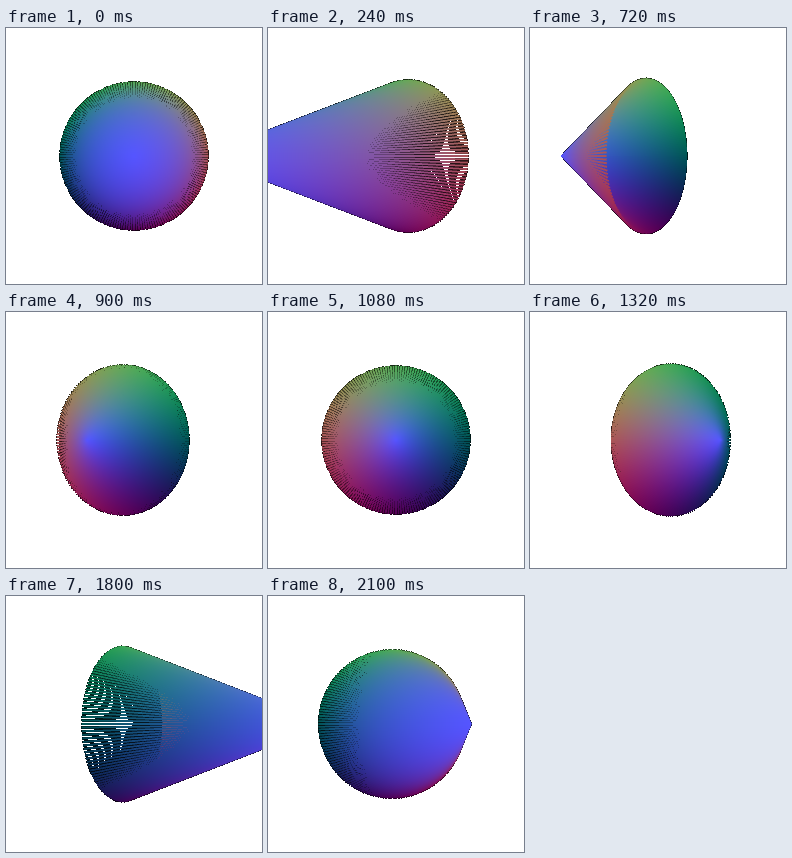
An HTML page with a canvas that plays this animation: 256 px wide and 256 px high, repeating every 2160 ms.

```html
<!DOCTYPE html>
<html lang="en">
<head>
<meta charset="utf-8">
<title>Turning cone</title>
<style>
html, body { margin: 0; width: 100%; height: 100%; overflow: hidden; background: #fff; }
canvas { display: block; width: 100vw; height: 100vh; image-rendering: pixelated; }
</style>
</head>
<body>
<canvas id="stage" width="256" height="256"></canvas>
<script>
const SIZE = 256, MID = SIZE / 2;
const STEPS = 36, STEP_MS = 60;
const LINES = 180, HALF_WIDTH = 1, CAP = .5;
const HEIGHT = 2, EYE = 3;
const FOCAL = MID / Math.tan(Math.PI / 6);
const SAMPLES = [[.375, .125], [.875, .375], [.125, .625], [.625, .875]];

const ctx = document.getElementById('stage').getContext('2d');
const image = ctx.createImageData(SIZE, SIZE);
const near = new Float32Array(SIZE * SIZE * 4);   // 1 / depth per sample, 0 = empty
const along = new Float32Array(near.length);      // 0 at the tip, 1 at the rim
const owner = new Uint16Array(near.length);       // line number

const rim = Array.from({ length: LINES }, (_, i) => {
  const a = 2 * Math.PI * i / LINES;
  return [Math.cos(a), Math.sin(a), 0];
});

function project([x, y, z], turn) {
  const c = Math.cos(turn), s = Math.sin(turn);
  const w = 1 / (EYE - x * s - z * c);
  return { x: MID + FOCAL * (x * c - z * s) * w, y: MID - FOCAL * y * w, w };
}

function samplePixel(px, py, a, b, id) {
  if (px < 0 || py < 0 || px >= SIZE || py >= SIZE) return;
  const dx = b.x - a.x, dy = b.y - a.y, len = Math.hypot(dx, dy) || 1;
  for (let k = 0; k < 4; k++) {
    const x = px + SAMPLES[k][0] - a.x, y = py + SAMPLES[k][1] - a.y;
    const run = (x * dx + y * dy) / len;
    if (run < -CAP || run > len + CAP) continue;
    if (Math.abs(x * dy - y * dx) > HALF_WIDTH * len) continue;
    const s = Math.min(1, Math.max(0, run / len));
    const w = a.w + (b.w - a.w) * s, n = (py * SIZE + px) * 4 + k;
    if (w <= near[n]) continue;
    near[n] = w;
    along[n] = s * b.w / w;
    owner[n] = id;
  }
}

function drawLine(a, b, id) {
  const flat = Math.abs(b.x - a.x) >= Math.abs(b.y - a.y);
  const [u, v] = flat ? ['x', 'y'] : ['y', 'x'];
  const slope = (b[v] - a[v]) / (b[u] - a[u] || 1);
  const from = Math.max(0, Math.floor(Math.min(a[u], b[u])) - 2);
  const to = Math.min(SIZE - 1, Math.ceil(Math.max(a[u], b[u])) + 2);
  for (let p = from; p <= to; p++) {
    const m = a[v] + (p + .5 - a[u]) * slope;
    for (let q = Math.floor(m - 2); q <= m + 2; q++) {
      if (flat) samplePixel(p, q, a, b, id);
      else samplePixel(q, p, a, b, id);
    }
  }
}

// Partly covered pixels fade to black, empty ones are white.
function resolve() {
  const out = image.data, unit = 85 / 4;
  for (let n = 0; n < near.length; n += 4) {
    let r = 0, g = 0, b = 0, hits = 0;
    for (let k = n; k < n + 4; k++) {
      if (!near[k]) continue;
      const t = along[k], [x, y] = rim[owner[k]];
      r += 1 + t * x;
      g += 1 + t * y;
      b += 1 + HEIGHT * (1 - t);
      hits++;
    }
    out[n] = hits ? r * unit : 255;
    out[n + 1] = hits ? g * unit : 255;
    out[n + 2] = hits ? b * unit : 255;
    out[n + 3] = 255;
  }
  ctx.putImageData(image, 0, 0);
}

function draw(step) {
  const turn = 2 * Math.PI * step / STEPS;
  const tip = project([0, 0, HEIGHT], turn);
  near.fill(0);
  rim.forEach((p, i) => drawLine(tip, project(p, turn), i));
  resolve();
}

let shown = -1;
function tick(now) {
  const step = Math.floor(now / STEP_MS) % STEPS;
  if (step !== shown) draw(shown = step);
  requestAnimationFrame(tick);
}
draw(shown = 0);
requestAnimationFrame(tick);
</script>
</body>
</html>
```
